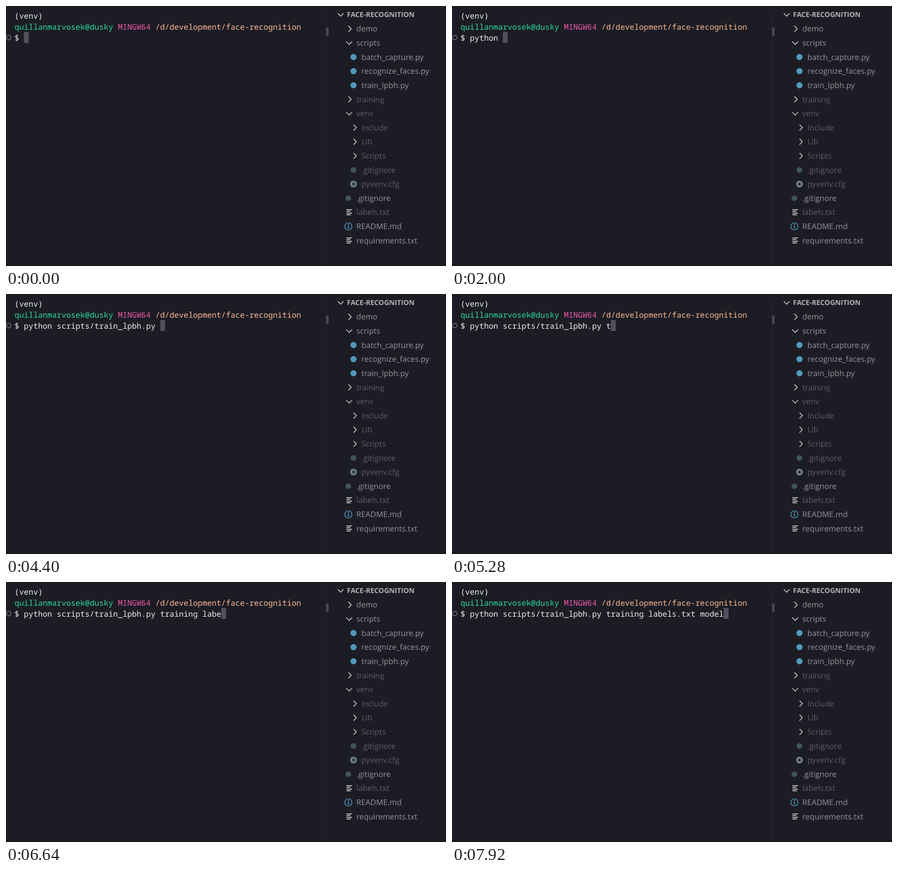
An HTML page that plays this animation: 800 px wide and 472 px high, repeating every 8000 ms.

```html
<!DOCTYPE html>
<html lang="en">
<head>
<meta charset="utf-8">
<title>Terminal and file tree</title>
<style>
  html, body { margin: 0; width: 100%; height: 100%; overflow: hidden; background: #1c1c25; }
  svg { display: block; width: 800px; height: 472px; }
  text { white-space: pre; text-rendering: geometricPrecision; }
  .term { font: 14.24px "Noto Sans Mono", "Liberation Mono", monospace; fill: #eff0f2; }
  .tree { font: 14.2px "Open Sans", "Noto Sans", sans-serif; fill: #95969c; }
  .tree .dim { fill: #5d5e66; }
  .tree .title { font-size: 12.6px; font-weight: 700; fill: #b0b1b6; }
  .chevron { fill: none; stroke: #d0d1d5; stroke-width: 1.4; }
</style>
</head>
<body>
<svg viewBox="0 0 800 472">
  <rect width="800" height="472" fill="#1c1c25"/>
  <rect x="581" y="6" width="1" height="464" fill="#25252e"/>
  <rect y="470" width="800" height="2" fill="#16161e"/>
  <rect x="582" y="39" width="4.5" height="15" fill="#4a4a54"/>
  <g class="term">
    <text x="15.5" y="22.8">(venv)</text>
    <text x="15.5" y="42.8"><tspan fill="#2bdb9b">quillanmarvosek@dusky</tspan> <tspan fill="#f05aab">MINGW64</tspan> <tspan fill="#fdb993">/d/development/face-recognition</tspan></text>
    <circle cx="5" cy="57.3" r="4" fill="none" stroke="#6c6c75" stroke-width="1.5"/>
    <rect id="cursor" y="47" width="8.8" height="20" fill="#50505e"/>
    <text id="command" x="15.5" y="62.8"></text>
  </g>
  <g id="tree" class="tree">
    <path class="chevron" d="M603.2 13.2l5.3 5.3 5.3-5.3"/>
    <text class="title" x="620" y="20.2">FACE-RECOGNITION</text>
  </g>
</svg>
<script>
const LOOP = 8000, LEFT = 15.5, PITCH = 8.544;
const BLUE = '#519aba', SLATE = '#6d8086', DARK = '#41535b', LIGHT = '#d4d5d8';

// Each icon is drawn around 0,0.
const teeth = Array.from({ length: 8 }, (_, i) =>
  `<rect x="-1.5" y="-6.5" width="3" height="3" transform="rotate(${i * 45})"/>`).join('');
const icons = {
  closed: '<path class="chevron" d="M-2.2-5.3l5.3 5.3-5.3 5.3"/>',
  open: '<path class="chevron" d="M-6-2.5l5.3 5.3 5.3-5.3"/>',
  code: `<circle r="5.6" fill="${BLUE}"/>`,
  ignore: `<circle r="5.2" fill="${DARK}"/>`,
  gear: `<g fill="${SLATE}">${teeth}</g><circle r="3.7" fill="none" stroke="${SLATE}" stroke-width="3"/>`,
  lines: `<path d="M-3.5-4.7h10M-3.5-1.6h7M-3.5 1.5h10M-3.5 4.6h8" stroke="${LIGHT}" stroke-width="1.5"/>`,
  info: `<circle r="6.5" fill="none" stroke="${BLUE}" stroke-width="1.4"/>
    <path d="M0-1v4.6M0-3.8v1.7" stroke="${BLUE}" stroke-width="1.9"/>`
};

// label, icon, nested, dim
const rows = [
  ['demo', 'closed', 0, 0],
  ['scripts', 'open', 0, 0],
  ['batch_capture.py', 'code', 1, 0],
  ['recognize_faces.py', 'code', 1, 0],
  ['train_lpbh.py', 'code', 1, 0],
  ['training', 'closed', 0, 1],
  ['venv', 'open', 0, 1],
  ['Include', 'closed', 1, 1],
  ['Lib', 'closed', 1, 1],
  ['Scripts', 'closed', 1, 1],
  ['.gitignore', 'ignore', 1, 1],
  ['pyvenv.cfg', 'gear', 1, 1],
  ['.gitignore', 'ignore', 0, 0],
  ['labels.txt', 'lines', 0, 1],
  ['README.md', 'info', 0, 0],
  ['requirements.txt', 'lines', 0, 0]
];

document.getElementById('tree').insertAdjacentHTML('beforeend', rows.map(([label, icon, nested, dim], i) => {
  const y = 41.4 + i * 25.62;
  const folder = icon === 'open' || icon === 'closed';
  const iconX = (folder ? 624.7 : 622.5) + nested * 9.3;
  return `<g transform="translate(${iconX} ${y})">${icons[icon]}</g>
    <text class="${dim ? 'dim' : ''}" x="${637 + nested * 9.2}" y="${y + 5}">${label}</text>`;
}).join(''));

// Typed pieces with the time of each key; the last key completes its whole remainder.
const typing = [
  ['python ', [1120, 1200, 1360, 1440, 1520, 1680, 1840]],
  ['scripts/', [2400, 2480, 2640, 2720, 2800, 2960, 3040, 3200]],
  ['train_lpbh.py ', [3920, 4000]],
  ['train', [4800, 5520, 5600, 5680, 5760]],
  ['ing ', [6000, 6080, 6160, 6240]],
  ['labels.txt ', [6400, 6480, 6560, 6640, 6720, 7040, 7120, 7200, 7280, 7360, 7440]],
  ['model', [7600, 7680, 7760, 7840, 7920]]
];

function typedAt(t) {
  return '$ ' + typing.map(([text, keys]) => {
    const pressed = keys.filter(key => key <= t).length;
    return pressed === keys.length ? text : text.slice(0, pressed);
  }).join('');
}

const command = document.getElementById('command');
const cursor = document.getElementById('cursor');

function draw(t) {
  const typed = typedAt(t);
  if (command.textContent !== typed) command.textContent = typed;
  cursor.setAttribute('x', LEFT + typed.length * PITCH);
}

const start = performance.now();
function tick() {
  draw((performance.now() - start) % LOOP);
  requestAnimationFrame(tick);
}
tick();
</script>
</body>
</html>
```
